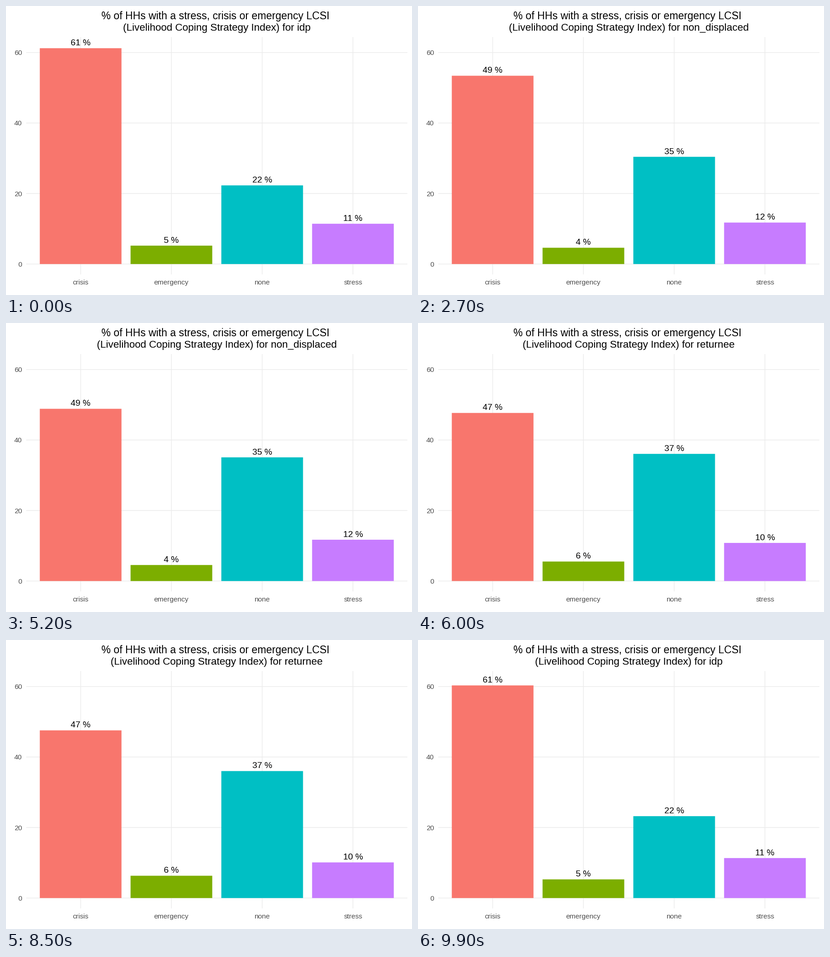
Animation of 885x632 px, one loop 10000 ms. Source, as a matplotlib script:

```python
import matplotlib.pyplot as plt
from matplotlib.animation import FuncAnimation
from matplotlib.patches import Rectangle

W, H, DPI = 885, 632, 64
FRAMES, INTERVAL = 100, 100
BASE, UNIT = 564.3, 7.71          # y of zero, pixels per percent
FIRST, STEP = 162.7, 197.86       # centre of the first bar, bar spacing
BAR_W = 0.9 * STEP

NAMES = ["crisis", "emergency", "none", "stress"]
COLORS = ["#F8766D", "#7CAE00", "#00BFC4", "#C77CFF"]
CENTERS = [FIRST + STEP * i for i in range(4)]

STATES = [
    ("idp", (61.22, 5.22, 22.31, 11.43)),
    ("non_displaced", (49.15, 4.30, 34.84, 11.95)),
    ("returnee", (46.65, 6.40, 36.93, 10.02)),
]
MOVES = [(16, 33), (50, 67), (84, 100)]   # first and last frame of each tween

plt.rcParams["font.family"] = "Liberation Sans"
fig = plt.figure(figsize=(W / DPI, H / DPI), dpi=DPI, facecolor="white")
ax = fig.add_axes([0, 0, 1, 1])
ax.set_xlim(0, W)
ax.set_ylim(H, 0)
ax.axis("off")


def px(size):
    return size * 72 / DPI


def text(x, y, s, size, color="black", ha="center"):
    return ax.text(x, y, s, fontsize=px(size), color=color, ha=ha,
                   va="baseline", zorder=4)


def grid_line(xs, ys):
    ax.plot(xs, ys, color="#EBEBEB", lw=px(1.4), snap=False,
            solid_capstyle="butt", zorder=1)


for value in (0, 20, 40, 60):
    y = BASE - value * UNIT
    grid_line((44, 875), (y, y))
    text(35, y + 5.5, str(value), 15.2, "#4D4D4D", "right")
for name, x in zip(NAMES, CENTERS):
    grid_line((x, x), (68, 587))
    text(x, 609, name, 15.2, "#4D4D4D")

text(456.5, 29, "% of HHs with a stress, crisis or emergency LCSI", 22.8)
subtitle = text(459.5, 54, "", 22.3)

bars, labels = [], []
for x, color in zip(CENTERS, COLORS):
    bar = Rectangle((x - BAR_W / 2, BASE), BAR_W, 0, fc=color, lw=0,
                    snap=False, zorder=2)
    bars.append(ax.add_patch(bar))
    labels.append(text(x, BASE, "", 19))


def pose(frame):
    """Return the two neighbouring states and the linear progress between them."""
    for i, (start, end) in enumerate(MOVES):
        if frame < end:
            t = max(0, (frame - start) / (end - start))
            return STATES[i], STATES[(i + 1) % len(STATES)], t
    return STATES[0], STATES[0], 0


def draw(frame):
    old, new, t = pose(frame)
    group, shown = new if t >= 0.5 else old
    subtitle.set_text(f"(Livelihood Coping Strategy Index) for {group}")
    for bar, label, a, b, value in zip(bars, labels, old[1], new[1], shown):
        height = (a + (b - a) * t) * UNIT
        bar.set_height(-height)
        label.set_y(BASE - height - 6.2)
        label.set_text(f"{value:.0f} %")
    return [subtitle, *bars, *labels]


anim = FuncAnimation(fig, draw, frames=FRAMES, interval=INTERVAL,
                     init_func=lambda: draw(0), repeat=True, repeat_delay=0)
plt.show()
```
